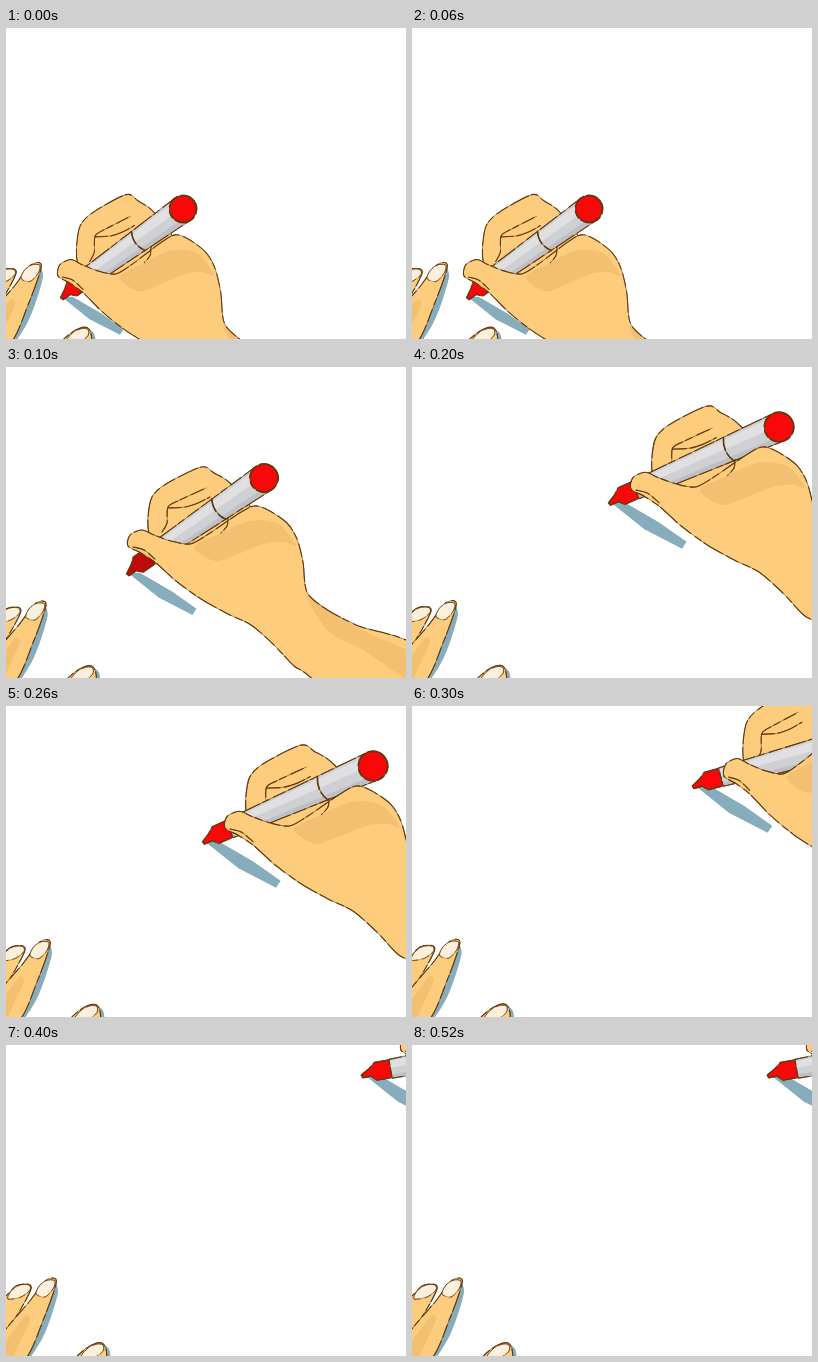
An HTML page with a canvas for the animation above (0.6 s loop, 400 by 311 pixels).

```html
<!DOCTYPE html>
<html lang="en">
<head>
<meta charset="utf-8">
<title>Drawing hand</title>
<style>
html, body { margin: 0; width: 100%; height: 100%; overflow: hidden; background: #fff; }
canvas { display: block; }
</style>
</head>
<body>
<canvas id="stage" width="400" height="311"></canvas>
<script>
const ctx = document.getElementById('stage').getContext('2d');
const SKIN = '#fdcc7c', SHADE = '#f3c072', INK = '#60380f', RED = '#f80808';
const CAST = '#87acbb', NAIL = '#fcefdc', BARREL = '#cfd0d4', SHINE = '#e0e0e3', DULL = '#bfc0c5';

const STEP = 100, LOOP = 600;
const PEN_UNIT = 164, TIP_LENGTH = 30, CAP_LENGTH = 55;

// Thumb position and hand scale, plus both ends of the pen
const poses = [
  { thumb: [52, 247], scale: [.93, 1.03], nib: [54, 269], end: [177, 181] },
  { thumb: [122, 178], scale: [1, 1], nib: [120, 206], end: [258, 111], tip: '#c4090c' },
  { thumb: [219, 121], scale: [1.04, 1.05], nib: [196, 135], end: [367, 60] },
  { thumb: [312, 69], scale: [.95, 1.1], nib: [280, 79], end: [464, 29] },
  { thumb: [395, 4], scale: [.95, 1.1], nib: [355, 29], end: [540, -4] }
];

// Right hand, measured from the tip of the thumb
const rightHand = {
  back: curve('21,-12 20,-28 24,-48 38,-61 73,-78 86,-72 102,-62 122,-38 100,-12 62,3 28,-6'),
  hollow: [curve('34,-13 39,-22 40,-38 52,-45 78,-57', false), curve('40,-37 57,-38 70,-42 82,-48', false)],
  front: curve('0,1 2,-10 14,-15 26,-10 43,-4 62,-1 79,-10 110,-31 126,-39 140,-35 159,-22 169,-6 175,17 179,47 198,64 228,80 300,113 300,240 188,137 166,121 146,100 123,80 100,69 73,54 48,36 28,18 13,8'),
  shade: [curve('66,2 91,-11 122,-24 150,-21 168,0 155,-3 136,-1 110,9 87,16'), curve('178,49 205,69 240,88 290,112 290,140 235,105 200,86')],
  creases: [curve('100,-27 99,-19 93,-12', false), curve('5,2 16,5 27,14', false)]
};

const leftHand = {
  cast: curve('48,239 52,247 45,272 36,294 22,315 13,315 39,268'),
  second: curve('-22,288 -10,260 1,250 10,241 21,239 25,244 13,267 0,284'),
  index: curve('-18,315 -4,289 23,257 38,237 47,233 50,239 38,273 18,315'),
  thumb: curve('70,315 78,305 88,299 96,298 100,304 98,315'),
  nails: [curve('2,254 5,246 14,240 23,240 24,245 15,252'), curve('30,249 34,240 42,235 49,236 47,244 39,252'),
    curve('75,312 82,303 91,299 97,300 97,306 89,312')],
  shade: curve('-10,312 9,284 20,270 24,275 15,295 5,314')
};

// Smooth curve through every point
function curve(text, closed = true) {
  const pts = text.split(' ').map(p => p.split(',').map(Number));
  const n = pts.length;
  const at = i => closed ? pts[(i + n) % n] : pts[Math.max(0, Math.min(n - 1, i))];
  const path = new Path2D();
  path.moveTo(...pts[0]);
  for (let i = 0; i < (closed ? n : n - 1); i++) {
    const [a, b, c, d] = [at(i - 1), at(i), at(i + 1), at(i + 2)];
    path.bezierCurveTo(
      b[0] + (c[0] - a[0]) / 7, b[1] + (c[1] - a[1]) / 7,
      c[0] - (d[0] - b[0]) / 7, c[1] - (d[1] - b[1]) / 7, c[0], c[1]);
  }
  if (closed) path.closePath();
  return path;
}

function polygon(...pts) {
  const path = new Path2D();
  pts.forEach(p => path.lineTo(...p));
  path.closePath();
  return path;
}

function fill(path, color) {
  ctx.fillStyle = color;
  ctx.fill(path);
}

// Faint line with broken strokes on top, like a pencil
function ink(path, weight = 1.1) {
  ctx.strokeStyle = INK;
  ctx.lineWidth = weight * .5;
  ctx.stroke(path);
  ctx.lineWidth = weight;
  ctx.setLineDash([13, 4, 21, 3, 7, 5]);
  ctx.stroke(path);
  ctx.setLineDash([]);
}

function shape(path, color, weight) {
  fill(path, color);
  ink(path, weight);
}

// Draws with the origin moved, then turned and scaled
function within([x, y], angle, [sx, sy], paint) {
  ctx.save();
  ctx.translate(x, y);
  ctx.rotate(angle);
  ctx.scale(sx, sy);
  paint();
  ctx.restore();
}

function drawPen({ nib, end, tip = RED }) {
  const dx = end[0] - nib[0], dy = end[1] - nib[1];
  const length = Math.hypot(dx, dy);
  const half = u => 8.5 + u / 30;
  const strip = (top, bottom, from = TIP_LENGTH, to = length) => polygon(
    [from, top * half(from)], [to, top * half(to)], [to, bottom * half(to)], [from, bottom * half(from)]);

  within(nib, Math.atan2(dy, dx), [1, 1], () => {
    shape(polygon([0, 1], [9, -4], [15, -9], [TIP_LENGTH, -9], [TIP_LENGTH, 9], [14, 9], [10, 4], [1, 4]), tip, 1.3);
    fill(strip(-1, 1), BARREL);
    fill(strip(-.8, -.1), SHINE);
    fill(strip(.6, 1), DULL);
    ink(strip(-1, 1));

    const seam = length - CAP_LENGTH, r = half(seam);
    const collar = new Path2D();
    collar.moveTo(seam, -r);
    collar.quadraticCurveTo(seam - 7, 0, seam, r);
    ink(collar, 1.6);

    const cap = new Path2D();
    cap.arc(length, 0, half(length), 0, Math.PI * 2);
    shape(cap, RED, 1.8);
  });
}

function drawCast({ nib, end }) {
  const size = Math.hypot(end[0] - nib[0], end[1] - nib[1]) / PEN_UNIT;
  within(nib, 0, [size, size], () => fill(polygon([2, 0], [14, 0], [45, 18], [69, 35], [65, 41], [32, 24]), CAST));
}

function drawRightHand(pose) {
  const { back, hollow, front, shade, creases } = rightHand;
  drawCast(pose);
  within(pose.thumb, 0, pose.scale, () => {
    shape(back, SKIN);
    hollow.forEach(line => ink(line));
  });
  drawPen(pose);
  within(pose.thumb, 0, pose.scale, () => {
    fill(front, SKIN);
    shade.forEach(patch => fill(patch, SHADE));
    ink(front);
    creases.forEach(line => ink(line));
  });
}

function drawLeftHand(slide) {
  const { cast, second, index, thumb, nails, shade } = leftHand;
  within([-15 * slide, 1.5 * slide], 0, [1, 1], () => {
    fill(cast, CAST);
    within([4, 3], 0, [1, 1], () => fill(thumb, CAST));
    [second, index, thumb].forEach(finger => shape(finger, SKIN));
    fill(shade, SHADE);
    nails.forEach(nail => shape(nail, NAIL, .8));
  });
}

function draw(time) {
  const last = poses.length - 1;
  const step = Math.min(last, Math.floor(time % LOOP / STEP));
  ctx.fillStyle = '#fff';
  ctx.fillRect(0, 0, 400, 311);
  drawLeftHand((1 - step / last) ** 1.3);
  drawRightHand(poses[step]);
}

ctx.lineJoin = ctx.lineCap = 'round';
const start = performance.now();
function tick() {
  draw(performance.now() - start);
  requestAnimationFrame(tick);
}
tick();
</script>
</body>
</html>
```
